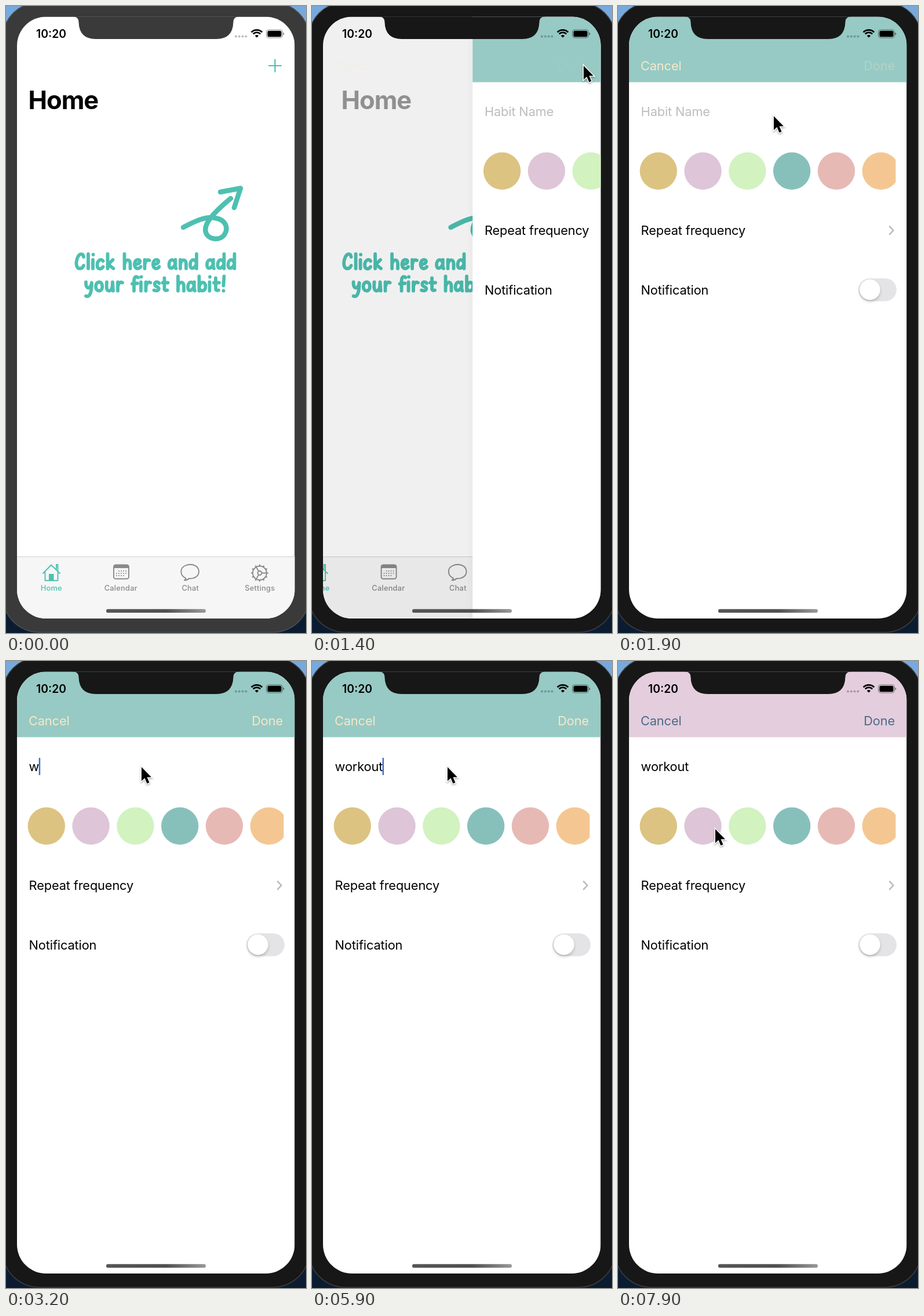
Animation, 518 px wide and 1082 px high, one loop 8000 ms. Source, as an HTML page with a canvas:

```html
<!DOCTYPE html>
<html lang="en">
<head>
<meta charset="utf-8">
<title>Habit app</title>
<style>
  html, body { margin: 0; width: 100%; height: 100%; overflow: hidden; }
  canvas { display: block; width: 518px; height: 1082px; }
</style>
</head>
<body>
<canvas id="stage" width="518" height="1082"></canvas>
<script>
const ctx = document.getElementById('stage').getContext('2d');
const LOOP = 8000, STEP = 100;
const LEFT = 19, TOP = 18.5, WIDTH = 479.5, HEIGHT = 1038.5, MARGIN = 39.6;
const TEAL = '#4dc0b1', GREY = '#8a8a8a';
const SWATCHES = ['#dcc382', '#dec5d8', '#d2f2c0', '#87c0bb', '#e7b9b5', '#f4c792'];
const ACTIVATE = 800, PUSH = 1267, FOCUS = 2400, PICK = 7400;
const KEYS = [3100, 3500, 4000, 4500, 5100, 5500, 5800];
const POINTER = [
  [300, 530, 200], [900, 467, 101], [1500, 467, 101], [1900, 267, 188],
  [2100, 232, 181], [6100, 232, 181], [6700, 153, 300], [6950, 153, 300], [7300, 166, 288]
];

const clamp = v => Math.min(1, Math.max(0, v));
const mix = (a, b, k) => a + (b - a) * k;

function layer(draw, alpha = 1) {
  ctx.save();
  ctx.globalAlpha *= alpha;
  draw();
  ctx.restore();
}

function box(x, y, w, h, color, r = 0) {
  ctx.beginPath();
  ctx.roundRect(x, y, w, h, r);
  ctx.fillStyle = color;
  ctx.fill();
}

function disc(x, y, r, color) {
  ctx.beginPath();
  ctx.arc(x, y, r, 0, Math.PI * 2);
  ctx.fillStyle = color;
  ctx.fill();
}

function stroke(path, color, width) {
  ctx.lineCap = ctx.lineJoin = 'round';
  ctx.strokeStyle = color;
  ctx.lineWidth = width;
  ctx.stroke(new Path2D(path));
}

function label(text, x, y, color, { size = 21.8, weight = 400, align = 'left', tracking = -0.15 } = {}) {
  ctx.font = `${weight} ${size}px Inter, sans-serif`;
  ctx.letterSpacing = tracking + 'px';
  ctx.textAlign = align;
  ctx.fillStyle = color;
  ctx.fillText(text, x, y);
  return ctx.measureText(text).width;
}

// Hand lettering: round-ended strokes on a common baseline, built from shared parts.
const TALL = 'M4-25V0', STEM = 'M4-15V0';
const ARCH = 'M4-7C6-17 14-17 14-8V0';
const BOWL = 'M14-8C12-18 3-17 3-6C3 3 12 0 14-9';
const GLYPHS = {
  C: [20, 'M16-20C15-27 9-26 6-20C1-8 4 1 10 0Q14 0 16-5'],
  l: [8, TALL], i: [8.5, STEM + 'M4.5-24h.1'],
  c: [17, 'M13-13C10-18 3-14 3-6C3 2 10 2 13-3'],
  k: [18, TALL + 'M13-15L5-7L14 0'],
  h: [18, TALL + ARCH], n: [18, STEM + ARCH],
  e: [17, 'M4-7C16-8 14-16 9-15C2-15 1 0 9 0Q12 0 14-3'],
  r: [15, STEM + 'M4-7Q6-17 12-14'],
  a: [18.5, BOWL + 'M14-15Q13-4 15 0'], d: [18, BOWL + 'M14-25V0'],
  y: [18, 'M4-15C3-3 12-1 14-14C14 2 11 12 4 9'],
  o: [18, 'M9-15C1-15 1 0 9 0C16 0 16-15 9-15'],
  u: [19, 'M4-15C3-4 4 0 8 0Q14 0 14-15L15 0'],
  f: [14, 'M13-23C8-27 6-22 6-16V0M3-12L12-13'],
  s: [15, 'M12-13C8-18 2-14 5-9C7-7 13-6 11-2Q9 1 3-1'],
  t: [14.5, 'M6-22V-3Q7 0 11-1M3-14H12'],
  b: [18, TALL + 'M4-6C6-18 15-16 15-8C15 2 6 2 4-5'],
  '!': [10, 'M6-25L5-9M5 0h.1'],
  ' ': [11, '']
};

function lettering(text, x, y) {
  layer(() => {
    ctx.translate(x, y);
    for (const char of text) {
      const [advance, path] = GLYPHS[char];
      stroke(path, TEAL, 5.8);
      ctx.translate(advance, 0);
    }
  });
}

function tabIcons() {
  stroke('M64 979L78 964.5L93 979M67.5 977V991.5H89.5V977M87 971V964H89.5V974', TEAL, 1.9);
  box(74, 980, 8.5, 12, TEAL);

  ctx.beginPath();
  ctx.roundRect(186, 964.5, 26, 24, 3.5);
  ctx.strokeStyle = GREY;
  ctx.lineWidth = 1.9;
  ctx.stroke();
  box(186, 964, 26, 6, GREY, [3, 3, 0, 0]);
  for (let i = 1; i < 14; i++) {
    disc(191 + (i % 5) * 4, 975 + Math.floor(i / 5) * 4, 1.05, GREY);
  }

  stroke('M310 987C300 983 300 970 309 966C322 960 333 967 333 976C333 984 325 989 316 988Q313 991 308 991Q311 989 310 987', GREY, 1.9);

  layer(() => {
    ctx.translate(438, 978.5);
    stroke('M12 0A12 12 0 1 1-12 0A12 12 0 1 1 12 0M3.5 0A3.5 3.5 0 1 1-3.5 0A3.5 3.5 0 1 1 3.5 0', GREY, 1.9);
    for (let i = 0; i < 12; i++) {
      if (i % 4 === 0) stroke('M4 0H11', GREY, 1.8);
      stroke('M12.5 0H14', GREY, 2.2);
      ctx.rotate(Math.PI / 6);
    }
  });
}

function homePage(p) {
  box(LEFT, TOP, WIDTH, HEIGHT, '#fff');
  layer(() => {
    ctx.translate(-144 * p, 0);
    stroke('M306 382C325 372 345 362 362 366C379 369 384 382 378 393C371 406 350 404 345 391C341 378 353 361 388 332M370 321L405 314.5L394 348', TEAL, 8.5);
    lettering('Click here and add', 118, 453);
    lettering('your first habit!', 134, 491.5);
    box(LEFT, 950, WIDTH + 1, 107, '#f6f6f6');
    box(LEFT, 950, WIDTH + 1, 1, '#cfcfcf');
    tabIcons();
    ['Home', 'Calendar', 'Chat', 'Settings'].forEach((name, i) =>
      label(name, 78.3 + i * 120, 1008.5, i ? GREY : TEAL,
        { size: 12.8, weight: 500, align: 'center', tracking: 0.25 }));
  });
  layer(() => label('Home', 38.5 + 26 * p, 178, '#000',
    { size: 43.5, weight: 700, tracking: -1 }), clamp(1 - 1.3 * p));
  layer(() => stroke('M454 103H475M464.5 92.5V113.5', TEAL, 2.2), clamp(1 - 3 * p));
  box(LEFT, TOP, WIDTH, HEIGHT, `rgba(0,0,0,${0.13 * p})`);
}

function nameField(t) {
  const typed = 'workout'.slice(0, KEYS.filter(k => k <= t).length);
  const width = typed
    ? label(typed, MARGIN, 190, '#000')
    : (label('Habit Name', MARGIN, 190, '#bdbdbf'), 0);
  const lastEdit = [FOCUS, ...KEYS].filter(k => k <= t).pop();
  if (lastEdit && t < PICK && (t - lastEdit) % 1000 < 600) {
    box(MARGIN + width - 0.6, 167, 2.5, 30, '#3f6fd0', 1);
  }
}

function formPage(t, offset) {
  layer(() => {
    ctx.translate(offset, 0);
    if (offset > 0) {
      const shade = ctx.createLinearGradient(LEFT - 12, 0, LEFT, 0);
      shade.addColorStop(0, 'rgba(0,0,0,0)');
      shade.addColorStop(1, 'rgba(0,0,0,.025)');
      box(LEFT - 12, TOP, 12, HEIGHT, shade);
    }
    box(LEFT, TOP, WIDTH, HEIGHT, '#fff');
    box(LEFT, TOP, WIDTH, 113, t < PICK ? '#97cac4' : '#e4cddc');
    nameField(t);
    layer(() => {
      ctx.beginPath();
      ctx.rect(LEFT, 240, 460.5, 90);
      ctx.clip();
      SWATCHES.forEach((color, i) => disc(69.8 + i * 76.8, 284.7, 32.2, color));
    });
    label('Repeat frequency', MARGIN, 395, '#000');
    stroke('M469 380.5L475.5 387.2L469 394', '#bdbdbf', 2.6);
    label('Notification', MARGIN, 497.5, '#000');
    box(415, 470, 66, 39.5, '#e4e4e6', 20);
    layer(() => {
      ctx.shadowColor = 'rgba(0,0,0,.2)';
      ctx.shadowBlur = 5;
      ctx.shadowOffsetY = 3;
      disc(435, 489.5, 17.7, '#fff');
    });
  });
}

function navItems(t, p) {
  const color = t < PICK ? '#f5e8c8' : '#4b6b8a';
  layer(() => label('Cancel', MARGIN - 0.6, 111, color), p * p);
  layer(() => label('Done', 478, 111, color, { align: 'right' }), p * p * (t < KEYS[0] ? 0.3 : 1));
}

function statusBar() {
  label('10:20', 52, 55, '#000', { size: 19.4, weight: 600, tracking: 0 });
  for (let i = 0; i < 4; i++) disc(397 + i * 5.8, 52.5, 2.1, 'rgba(0,0,0,.25)');
  [13.2, 8.8, 4.4].forEach((r, i) => {
    ctx.beginPath();
    ctx.arc(433, 54.5, r, -Math.PI * 0.75, -Math.PI * 0.25);
    if (i === 2) {
      ctx.lineTo(433, 54.5);
      ctx.fillStyle = '#000';
      ctx.fill();
    } else {
      ctx.lineCap = 'butt';
      ctx.strokeStyle = '#000';
      ctx.lineWidth = 2.8;
      ctx.stroke();
    }
  });
  ctx.beginPath();
  ctx.roundRect(449.7, 41, 27.5, 14, 4.2);
  ctx.strokeStyle = 'rgba(0,0,0,.45)';
  ctx.lineWidth = 1.2;
  ctx.stroke();
  box(451.5, 42.8, 24, 10.4, '#000', 2.8);
  box(478.5, 45.7, 1.7, 4.6, 'rgba(0,0,0,.5)', [0, 2, 2, 0]);
}

function homeIndicator() {
  const shade = ctx.createLinearGradient(173, 1041, 345, 1047);
  shade.addColorStop(0, '#555');
  shade.addColorStop(0.6, '#505050');
  shade.addColorStop(1, '#999');
  box(173, 1040.8, 172, 6.2, shade, 3.1);
}

function notch(color) {
  ctx.fillStyle = color;
  ctx.fill(new Path2D('M116 17V18.5Q125.5 18.5 125.5 28Q126.5 57 155 57H363Q391.5 57 392.5 28Q392.5 18.5 402 18.5V17Z'));
}

function pointer(t) {
  const next = POINTER.findIndex(k => k[0] > t);
  if (next === 0) return;
  const b = POINTER[next < 0 ? POINTER.length - 1 : next];
  const a = next < 0 ? b : POINTER[next - 1];
  const u = a === b ? 0 : (t - a[0]) / (b[0] - a[0]);
  const k = u * u * (3 - 2 * u);
  layer(() => {
    ctx.translate(mix(a[1], b[1], k) + 1, mix(a[2], b[2], k) + 1);
    const arrow = new Path2D('M1 1V25L6.5 20L10.5 29.5L14.5 27.8L10.5 18.5H18Z');
    ctx.shadowColor = 'rgba(0,0,0,.35)';
    ctx.shadowBlur = 3;
    ctx.shadowOffsetY = 1.5;
    ctx.lineJoin = 'miter';
    ctx.strokeStyle = '#fff';
    ctx.lineWidth = 3;
    ctx.stroke(arrow);
    ctx.shadowColor = 'transparent';
    ctx.fillStyle = '#000';
    ctx.fill(arrow);
  });
}

function render(t) {
  const p = 1 - (1 - clamp((t - PUSH) / 500)) ** 2;
  const bezel = t < ACTIVATE ? '#3a3a3a' : '#171717';

  box(0, 0, 518, 541, '#78a9dc');
  box(0, 541, 518, 541, '#0b1c30');
  box(-7, -7, 532, 1088.5, t < ACTIVATE ? '#4b4d50' : '#3a3c3f', 64);
  box(-5.5, -5.5, 529, 1085.5, bezel, 63);

  layer(() => {
    ctx.beginPath();
    ctx.roundRect(LEFT, TOP, WIDTH, HEIGHT, 50);
    ctx.clip();
    if (p < 1) homePage(p);
    if (p > 0) {
      formPage(t, WIDTH * (1 - p));
      navItems(t, p);
    }
    statusBar();
    homeIndicator();
    notch(bezel);
  });
  pointer(t);
}

const start = performance.now();
function tick() {
  const elapsed = (performance.now() - start) % LOOP;
  render(Math.floor(elapsed / STEP) * STEP);
  requestAnimationFrame(tick);
}
tick();
</script>
</body>
</html>
```
